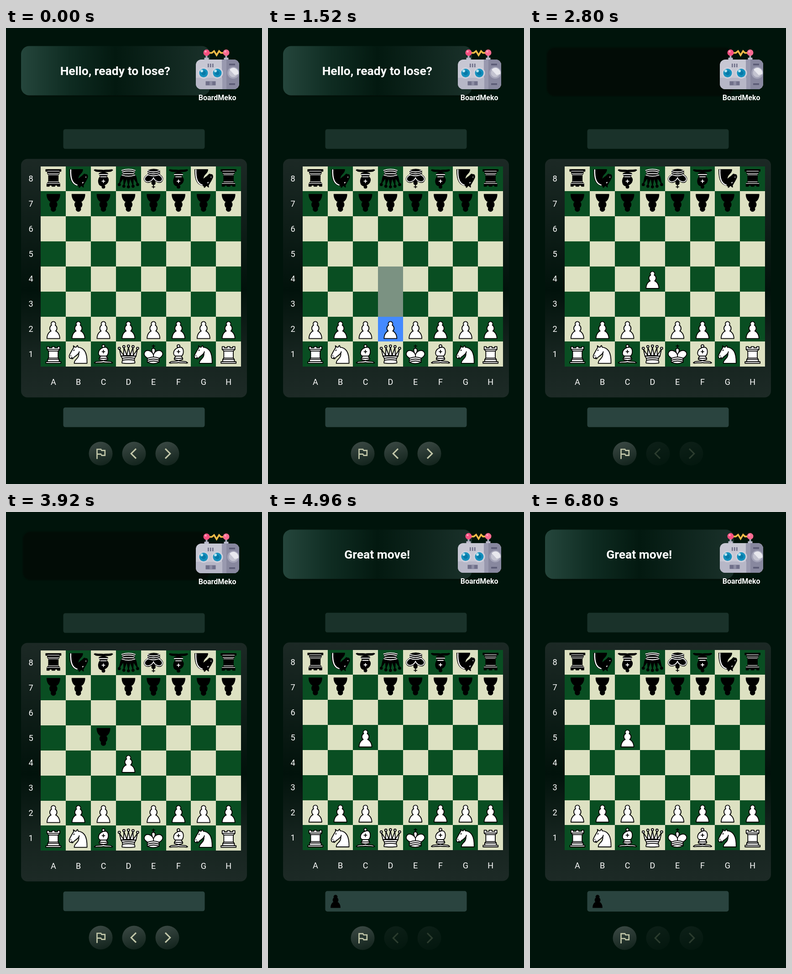
These frames come from a looping animation (561x998 px, 6.88 s). An HTML page:

```html
<!DOCTYPE html>
<html lang="en">
<head>
<meta charset="utf-8">
<title>Chess game</title>
<style>
html, body { margin: 0; width: 100%; height: 100%; overflow: hidden; background: #00140b; }
svg { display: block; width: 100%; height: 100%; }
text { font-family: Roboto, sans-serif; fill: #fff; text-anchor: middle; }
</style>
</head>
<body>
<svg id="stage" viewBox="0 0 561 998">
  <defs>
    <linearGradient id="bannerFill">
      <stop offset="0" stop-color="#25463c"/><stop offset=".25" stop-color="#0f2c22"/>
      <stop offset=".5" stop-color="#031910"/><stop offset="1" stop-color="#1a312a"/>
    </linearGradient>
    <linearGradient id="panelFill" x2="0" y2="1">
      <stop offset="0" stop-color="#1c2925"/><stop offset=".55" stop-color="#01120b"/>
      <stop offset=".8" stop-color="#15231e"/><stop offset="1" stop-color="#1d2a26"/>
    </linearGradient>
    <linearGradient id="buttonFill" x1=".3" x2=".6" y2="1">
      <stop offset="0" stop-color="#3a4843"/><stop offset="1" stop-color="#13241d"/>
    </linearGradient>
    <clipPath id="headClip"><rect x="416" y="69" width="95" height="65" rx="12"/></clipPath>
    <filter id="soft" color-interpolation-filters="sRGB"><feGaussianBlur stdDeviation="1.6"/></filter>
  </defs>
  <rect width="561" height="998" fill="#00140b"/>
  <g id="upper">
    <rect x="37" y="43" width="408" height="106" rx="17" fill="#020c06" filter="url(#soft)"/>
    <g id="banner">
      <rect x="33" y="39.5" width="414" height="108" rx="18" fill="url(#bannerFill)"/>
      <text id="speech" x="239.3" y="103" font-size="26.5" font-weight="700"></text>
    </g>
    <g id="robot"></g>
    <text x="463.2" y="158" font-size="16" font-weight="700">BoardMeko</text>
    <rect x="125.5" y="221.5" width="310" height="43" rx="4.5" fill="#1a322a"/>
    <rect x="33" y="286.5" width="495" height="522" rx="14" fill="url(#panelFill)"/>
    <g id="squares" shape-rendering="crispEdges"></g>
    <g id="labels" font-size="18"></g>
    <g id="pieces"></g>
  </g>
  <rect id="tray" x="125.5" width="310" rx="4.5" fill="#2a443f"/>
  <g id="captured"></g>
  <g id="controls"></g>
</svg>
<script>
const LOOP = 6880;
const SELECT_1 = 1360, HIDE_BANNER = 1680, MOVE_1 = 1760, REPLY = 2880, SELECT_2 = 4480, CAPTURE = 4960;
const LEFT = 76.4, TOP = 302.5, SIZE = 54.84;
const LIGHT = '#dde1c2', DARK = '#094e22', BLUE = '#448aff', TARGET = '#7b9282';

const byId = id => document.getElementById(id);
const path = (d, attrs = '') => `<path d="${d}" ${attrs}/>`;
const rect = (x, y, w, h, fill) => `<rect x="${x}" y="${y}" width="${w}" height="${h}" fill="${fill}"/>`;
const circle = (x, y, r, fill) => `<circle cx="${x}" cy="${y}" r="${r}" fill="${fill}"/>`;

// Pieces are drawn in a 45-unit box, mostly symmetric about its centre line.
const MID = 22.5;
const polygon = points => path(`M${points.join('L')}z`);

// Closed shape from its right-hand profile of [half width, y] points
const turned = (...profile) => polygon([
  ...profile.map(([half, y]) => [MID + half, y]),
  ...profile.reverse().map(([half, y]) => [MID - half, y])
]);

// Horizontal line across a piece, bowed by bend
const band = (half, y, bend = 0) => `M${MID - half} ${y}q${half} ${bend} ${2 * half} 0`;

const SPIKES = [-2, -1, 0, 1, 2];

function crown() {
  const rim = SPIKES.flatMap(i => {
    const tip = [MID + 8.1 * i, 10 + .9 * i * i];
    return i < 2 ? [tip, [MID + 5.8 * (i + .5), 24.8]] : [tip];
  });
  return polygon([[9, 26], ...rim, [36, 26]]);
}

const art = {
  P: () => path('M11 39.5H34C34 31.6 29.6 27 26.6 26A6.5 6.5 0 0 0 25.7 15.4 4 4 0 1 0 19.3 15.4 6.5 6.5 0 0 0 18.4 26C15.4 27 11 31.6 11 39.5z'),

  R: (white, line) => turned([13.5, 39], [13.5, 36], [10.5, 36], [10.5, 32], [8.5, 29.5], [8.5, 17],
    [11.5, 14], [11.5, 9], [7.5, 9], [7.5, 11], [2.5, 11], [2.5, 9])
    + line(band(10.5, 36) + band(10, 32) + band(8.5, 29.5) + band(8.5, 17) + band(11.5, 14), white ? 1.5 : 1),

  N: (white, line) => path('M22 10C32 11 38.5 18 38 39H15C15 30 25 32.5 23 18')
    + path('M24 18C24 21 18.5 25.5 16 27S13 31 11 31L11 28 10 30Q6 31 6 26C6 24 12 14 12 14L14 10.5 13.5 7.5 16.5 10H18.5Q19 8 21 7L22 10')
    + line('M9 25.4V25.6M14.8 15L14.2 16', 1.6)
    + (white ? '' : line('M25 11.3C33 13.5 37 22 36.3 38.5', 2)),

  B: (white, line) => path('M22.5 34C19 36 12 35 9 36L6 38Q7 39 9 38.5C12 37.5 19 39 22.5 37.5 26 39 33 37.5 36 38.5Q38 39 39 38L36 36C33 35 26 36 22.5 34z')
    + path('M15 32Q22.5 35.7 30 32V30L27.5 26H17.5L15 30z')
    + path('M17.5 26C12 24.5 11.5 14.5 22.5 10.5S33 24.5 27.5 26z')
    + `<circle cx="${MID}" cy="8" r="2.5"/>`
    + line(band(5, 26) + band(7.5, 30) + band(2.5, 18) + 'M22.5 15.5v5'),

  Q: (white, line) => crown()
    + turned([13.5, 26], [11, 30], [10.5, 33.5], [11.5, 36], [11.5, 38.5], [4, 39.2])
    + SPIKES.map(i => `<circle cx="${MID + 8.25 * i}" cy="${8 + i * i}" r="2"/>`).join('')
    + line(white ? band(13.5, 26, -2.5) + band(11, 30, -2) + band(10.5, 33.5, -2)
      : band(11.5, 29, -4) + band(10, 31.5) + band(11, 34.5, 4) + band(12, 37.5, 4)),

  K: (white, line) => path(band(2.5, 8) + 'M22.5 11.6V6')
    + path('M22.5 25Q28.5 12.5 22.5 12T22.5 25z')
    + path('M11.5 37Q22 42 32.5 37V30S41.5 25.5 38.5 19.5C34.5 13 25 16 22.5 23.5V27 23.5C19 16 9.5 13 6.5 19.5 3.5 25.5 11.5 29.5 11.5 29.5z')
    + (white ? '' : line('M32 29.5S40.5 25.5 38 20C34 14 25 18 22.5 24.5 20 18 11 14 7 20 4.5 25.5 13 29.5 13 29.5'))
    + line([30, 33.5, 37].map(y => band(10.5, y, -4.5)).join(''))
};

function pieceArt(kind, white) {
  const ink = white ? '#000' : '#fff';
  const line = (d, width = 1.5) => path(d, `fill="none" stroke="${ink}" stroke-width="${width}"`);
  return `<g fill="${white ? '#fff' : '#000'}" stroke="#000" stroke-width="1.5" stroke-linejoin="round"
    stroke-linecap="round">${art[kind](white, line)}</g>`;
}

// Black pieces face the opposite player, so they are turned half round.
function place(el, col, row, white) {
  const k = SIZE / 45, turn = white ? 0 : 1;
  el.setAttribute('transform',
    `translate(${LEFT + (col + turn) * SIZE} ${TOP + (row + turn) * SIZE}) scale(${white ? k : -k})`);
}

function addPiece(kind, col, row, white) {
  const el = document.createElementNS('http://www.w3.org/2000/svg', 'g');
  el.innerHTML = pieceArt(kind, white);
  place(el, col, row, white);
  byId('pieces').append(el);
  return el;
}

const squareColor = (col, row) => (col + row) % 2 ? DARK : LIGHT;
let squares = '', labels = '';
for (let row = 0; row < 8; row++) {
  for (let col = 0; col < 8; col++) {
    squares += rect(LEFT + col * SIZE, TOP + row * SIZE, SIZE, SIZE, squareColor(col, row));
  }
  const middle = (row + .5) * SIZE;
  labels += `<text x="54.5" y="${TOP + middle + 6.2}">${8 - row}</text>`
    + `<text x="${LEFT + middle}" y="781.4">${'ABCDEFGH'[row]}</text>`;
}
byId('squares').innerHTML = squares;
byId('labels').innerHTML = labels;

const whitePawns = [], blackPawns = [];
[...'RNBQKBNR'].forEach((kind, col) => {
  addPiece(kind, col, 0, false);
  blackPawns.push(addPiece('P', col, 1, false));
  whitePawns.push(addPiece('P', col, 6, true));
  addPiece(kind, col, 7, true);
});
byId('captured').innerHTML = `<g transform="translate(128 830.6) scale(.889)">${pieceArt('P', false)}</g>`;

const eye = x => circle(x, 98.5, 12.5, '#d0d0dc') + circle(x, 98.5, 9.5, '#1490bd')
  + circle(x, 98.5, 5, '#087aa8') + circle(x - 4, 94, 3, '#b5e4f0');
const antenna = (x, color) => rect(x - 2, 59, 4, 9, '#a5a5b8') + rect(x - 5, 65, 10, 5, '#b9b9c9')
  + circle(x, 54, 7, color) + circle(x - 2, 51.5, 2.2, '#ffa0b8');
const vents = [442, 447, 452].map(x => rect(x, 78, 2.6, 8, '#6f6f89')).join('');
const slots = [78, 121].map(y => rect(489, y, 13, 3.6, '#5c5c76')).join('');
byId('robot').innerHTML =
  path('M445 54.5H451L456 50.5 461.5 59.5 467 50.5 471 54.5H477', 'fill="none" stroke="#f4bd48" stroke-width="3.6"')
  + antenna(439.5, '#f94f80') + antenna(482.5, '#fa6b91')
  + `<g clip-path="url(#headClip)">${rect(416, 69, 95, 65, '#c7c7d3')}`
  + rect(473, 69, 38, 65, '#9999af') + rect(483, 69, 28, 65, '#88889f')
  + rect(416, 109, 58, 25, '#b7b7c7') + '</g>'
  + vents + slots + eye(433) + eye(463)
  + circle(498, 98, 13, '#a4a4b8') + circle(498, 98, 9.5, '#c3c3d0')
  + path('M490 91A11 11 0 0 1 509 101L501 103z', 'fill="#e8e8ee"')
  + rect(437.5, 116.5, 22, 9, '#70708a') + rect(446, 116.5, 6, 9, '#8d8da4');

const FLAG = 'M14 6l-1-2H5v17h2v-7h5l1 2h7V6h-6zm4 8h-4l-1-2H7V6h5l1 2h5v6z';
const button = (x, icon) => `<g transform="translate(${x} 931.5)">${circle(0, 0, 26, 'url(#buttonFill)')}${icon}</g>`;
const chevron = side => path(`M${-4.5 * side} -10.7L${6.2 * side} 0L${-4.5 * side} 10.7`,
  'fill="none" stroke="#c3c8aa" stroke-width="3.1"');
byId('controls').innerHTML =
  button(207.5, path(FLAG, 'fill="#c3c8aa" transform="translate(-16 -16.2) scale(1.333)"'))
  + button(280.5, chevron(-1)) + button(353.5, chevron(1));
const arrows = [...byId('controls').children].slice(1);

const show = (el, on) => el.setAttribute('visibility', on ? 'visible' : 'hidden');
const shift = (el, y) => el.setAttribute('transform', `translate(0 ${y})`);

function paint(col, row, color) {
  const el = byId('squares').children[row * 8 + col];
  el.setAttribute('fill', color || squareColor(col, row));
}

function draw(t) {
  const captured = t >= CAPTURE;
  const firstPick = t >= SELECT_1 && t < MOVE_1;
  const secondPick = t >= SELECT_2 && !captured;

  show(byId('banner'), t < HIDE_BANNER || captured);
  byId('speech').textContent = captured ? 'Great move!' : 'Hello, ready to lose?';

  paint(3, 6, firstPick && BLUE);
  paint(3, 5, firstPick && TARGET);
  paint(3, 4, firstPick ? TARGET : secondPick && BLUE);
  paint(2, 3, secondPick && TARGET);
  paint(3, 3, secondPick && TARGET);

  if (captured) place(whitePawns[3], 2, 3, true);
  else place(whitePawns[3], 3, t < MOVE_1 ? 6 : 4, true);
  place(blackPawns[2], 2, t < REPLY ? 1 : 3, false);
  show(blackPawns[2], !captured);
  show(byId('captured'), captured);

  const playerTurn = t < MOVE_1 || (t >= REPLY && !captured);
  arrows.forEach(el => el.setAttribute('opacity', playerTurn ? 1 : .22));

  // The tray grows slightly when it holds a piece and pushes the rest apart.
  const grow = captured ? .9 : 0;
  shift(byId('upper'), -grow);
  shift(byId('controls'), grow);
  byId('tray').setAttribute('y', 830.5 - grow);
  byId('tray').setAttribute('height', 43 + 2 * grow);
}

const start = performance.now();
function tick() {
  draw((performance.now() - start) % LOOP);
  requestAnimationFrame(tick);
}
tick();
</script>
</body>
</html>
```
